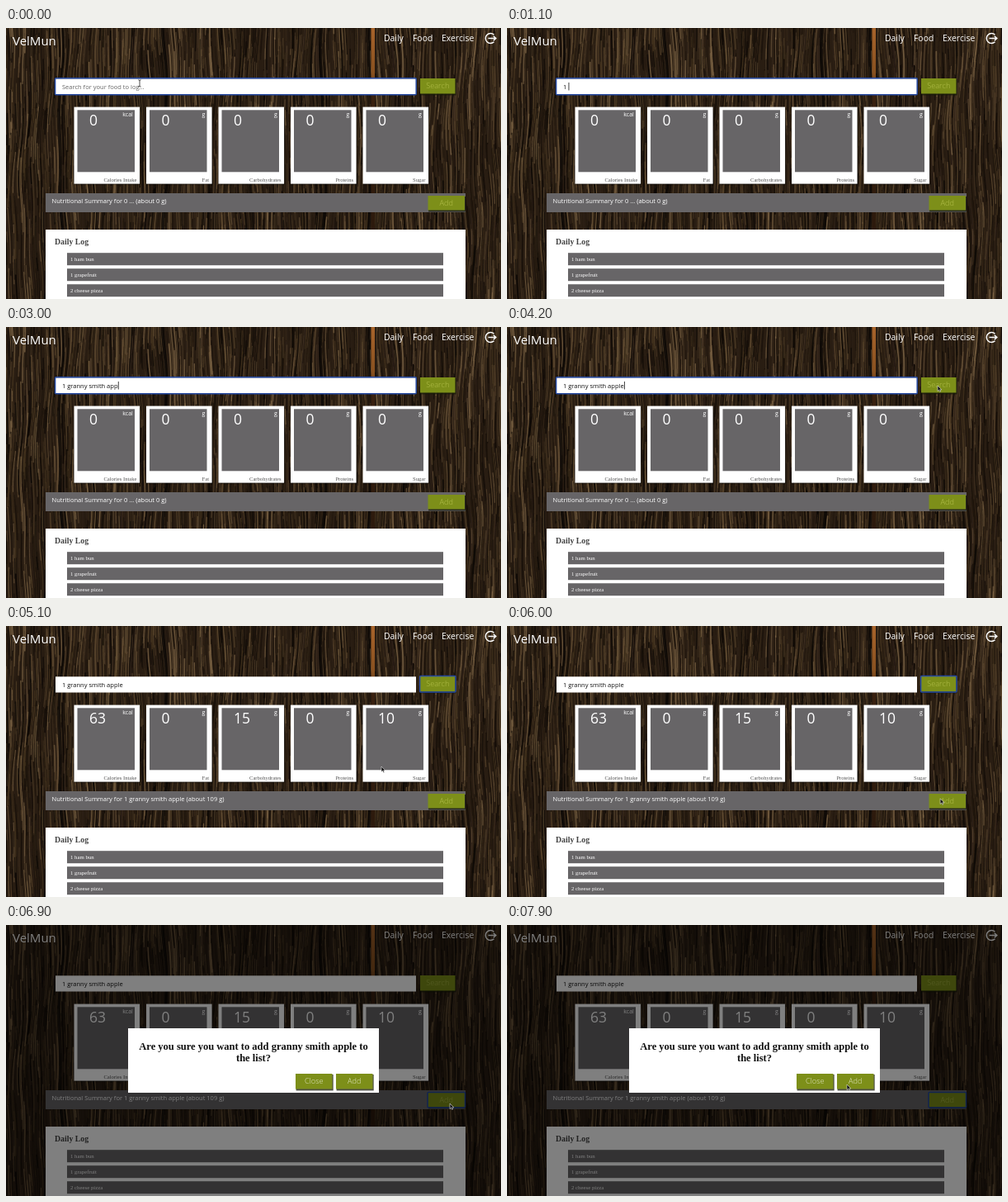
These frames come from a looping animation (600 by 328 pixels, 8000 ms). An HTML page with a canvas:

```html
<!DOCTYPE html>
<html lang="en">
<head>
<meta charset="utf-8">
<title>Food log</title>
<style>
  html, body { margin: 0; width: 100%; height: 100%; overflow: hidden; background: #21170e; }
  canvas, svg { position: absolute; left: 0; top: 0; width: 100vw; height: 100vh; display: block; }
  text { font-family: "Open Sans", "Noto Sans", sans-serif; white-space: pre; }
  .serif { font-family: "Liberation Serif", "Noto Serif", serif; }
  .thin { font-weight: 300; }
</style>
</head>
<body>
<canvas id="wood" width="600" height="328"></canvas>
<svg id="stage" viewBox="0 0 600 328" preserveAspectRatio="none"></svg>
<script>
const LOOP = 8000;
const QUERY = '1 granny smith apple';
const GREY = '#676567';
const GREEN = '#7d8f19';
const stage = document.getElementById('stage');

function add(tag, attrs, parent = stage) {
  const node = document.createElementNS('http://www.w3.org/2000/svg', tag);
  for (const key in attrs) node.setAttribute(key, attrs[key]);
  parent.appendChild(node);
  return node;
}
function box(x, y, w, h, fill, parent, extra = {}) {
  return add('rect', { x, y, width: w, height: h, fill, ...extra }, parent);
}
function label(content, x, y, size, fill, extra = {}, parent = stage) {
  const node = add('text', { x, y, 'font-size': size, fill, ...extra }, parent);
  node.textContent = content;
  return node;
}
function button(content, x, y, w, h, ink, parent = stage) {
  box(x + .6, y + 1, w + .6, h + .9, '#171a08', parent, { opacity: .75 });
  box(x, y, w, h, GREEN, parent);
  label(content, x + w / 2, y + h / 2 + 3.2, 9.2, ink, { 'text-anchor': 'middle', class: 'thin' }, parent);
}
function ring(x, y, w, h) {
  return box(x, y, w, h, 'none', stage, { stroke: '#2448a0', 'stroke-width': 1.5, rx: 1 });
}
function show(node, visible) {
  node.setAttribute('visibility', visible ? 'visible' : 'hidden');
}

function paintWood() {
  const g = document.getElementById('wood').getContext('2d');
  let seed = 4711;
  const rnd = () => (seed = (seed * 16807) % 2147483647) / 2147483647;
  const tones = ['#090604', '#120c07', '#1d140c', '#30231a', '#46351f', '#5f4a30', '#806747'];
  const bend = (x, y) => 2.2 * Math.sin(y / 47 + x / 38) + 1.2 * Math.sin(y / 19 + x / 11);
  g.fillStyle = '#291d12';
  g.fillRect(0, 0, 600, 328);
  g.lineCap = 'round';
  function grain(x, y, length, width, color, alpha) {
    g.globalAlpha = alpha;
    g.strokeStyle = color;
    g.lineWidth = width;
    g.beginPath();
    for (let d = 0; d <= length; d += 6) g.lineTo(x + bend(x, y + d), y + d);
    g.stroke();
  }
  for (let i = 0; i < 5200; i++) {
    const tone = tones[Math.floor(rnd() * tones.length)];
    grain(rnd() * 606 - 3, rnd() * 400 - 70, 12 + rnd() * 85, .4 + rnd() * 1.3, tone, .35 + rnd() * .5);
  }
  for (const x of [67, 193, 384, 441]) grain(x, -4, 340, 3.5, '#070403', .75);
  g.globalAlpha = 1;
  const seam = g.createLinearGradient(0, 0, 0, 328);
  seam.addColorStop(0, '#a8642b');
  seam.addColorStop(.17, '#87501f');
  seam.addColorStop(.24, '#3a2110');
  seam.addColorStop(1, '#25160b');
  g.fillStyle = seam;
  g.fillRect(442.5, 0, 4.5, 328);
}
paintWood();

// Header
label('VelMun', 8, 21, 15, '#fff');
label('Daily', 458, 16.3, 10.4, '#fff');
label('Food', 493, 16.3, 10.4, '#fff');
label('Exercise', 528, 16.3, 10.4, '#fff');
add('path', {
  d: 'M591.5 8.2A6 6 0 1 0 591.5 16.8M584.5 12.5H593.5M590.8 9.8L593.8 12.5L590.8 15.2',
  fill: 'none', stroke: '#fff', 'stroke-width': 1.5
});

// Search
box(60, 61.3, 437, 19.2, '#fff');
const inputRing = ring(59.6, 60.8, 437.6, 20);
const query = label('', 68, 73.7, 7.53, '#222');
const caret = box(0, 66, .8, 9.5, '#111');
button('Search', 502, 61, 42.5, 18.5, '#b4c04c');
const searchRing = ring(501.6, 60.6, 43.4, 19.4);

// Nutrient cards
const cards = [
  ['Calories Intake', 'kcal', 63], ['Fat', 'g', 0], ['Carbohydrates', 'g', 15],
  ['Proteins', 'g', 0], ['Sugar', 'g', 10]
].map(([name, unit, amount], i) => {
  const x = 82.5 + i * 87.5;
  box(x + .6, 96.4, 80, 93.2, '#000', stage, { opacity: .5 });
  box(x, 95.6, 79.6, 93, '#fff');
  box(x + 4, 99.3, 69.5, 75, GREY);
  label(unit, x + 71.3, 106.7, 7, '#fff', { 'text-anchor': 'end' });
  label(name, x + 76, 186.4, 6.6, '#555', { 'text-anchor': 'end', class: 'serif' });
  return { amount, node: label('0', x + 18.5, 118.4, 17.5, '#fff') };
});

// Summary
box(48, 200, 509, 23, GREY);
const summary = label('', 55.5, 212, 7.53, '#fff');
button('Add', 511.5, 203, 44.5, 17.5, '#b4c04c');
const addRing = ring(511, 202.5, 45.5, 18.6);

// Daily log
box(48, 244, 509, 84, '#fff');
label('Daily Log', 59, 262, 9.8, '#444', { class: 'serif', 'font-weight': 700 });
['1 ham bun', '1 grapefruit', '2 cheese pizza'].forEach((item, i) => {
  box(74, 272.2 + i * 19, 456, 15, GREY);
  label(item, 78, 282 + i * 19, 6.8, '#fff', { class: 'serif' });
});

// Confirmation dialog
const dialog = add('g', {});
box(0, 0, 600, 328, '#000', dialog, { opacity: .5 });
box(148, 125, 304, 78, '#fff', dialog);
['Are you sure you want to add granny smith apple to', 'the list?'].forEach((line, i) =>
  label(line, 300, 151 + i * 14.3, 12.5, '#111',
    { class: 'serif', 'font-weight': 700, 'text-anchor': 'middle' }, dialog));
button('Close', 351, 180, 44.5, 18.5, '#e4e8c4', dialog);
button('Add', 400, 180, 44.5, 18.5, '#e4e8c4', dialog);

// Pointers
const arrow = add('path', {
  d: 'M0 0V6.6L1.6 5.2L2.6 7.5L3.7 7L2.7 4.8H4.8Z', fill: '#111', stroke: '#fff', 'stroke-width': .5
});
const beam = add('path', {
  d: 'M-1.6 -4.2Q0 -4.2 0 -3.2V3.2Q0 4.2 -1.6 4.2M1.6 -4.2Q0 -4.2 0 -3.2M0 3.2Q0 4.2 1.6 4.2',
  fill: 'none', stroke: '#222', 'stroke-width': .8
});

const path = [
  [0, 162, 67], [3600, 162, 67], [4200, 522, 71], [4650, 522, 71],
  [5100, 455, 170], [5400, 455, 170], [6200, 538, 216], [7000, 538, 216], [7700, 412, 193], [LOOP, 412, 193]
];
function pointerAt(t) {
  const i = Math.max(1, path.findIndex(p => p[0] > t));
  const [t0, x0, y0] = path[i - 1], [t1, x1, y1] = path[i];
  const u = (t - t0) / (t1 - t0), k = u * u * (3 - 2 * u);
  return [x0 + (x1 - x0) * k, y0 + (y1 - y0) * k];
}

function render(t) {
  const typed = t < 1000 ? 0 : Math.min(QUERY.length, Math.floor(2 + Math.max(0, t - 1100) / 118));
  const searched = t >= 4300, found = t >= 4600, adding = t >= 6600;

  query.textContent = typed ? QUERY.slice(0, typed) : 'Search for your food to log...';
  query.setAttribute('fill', typed ? '#111' : '#666');
  const typing = typed > 0 && typed < QUERY.length;
  show(caret, typed > 0 && !searched && (typing || t % 1000 < 500));
  caret.setAttribute('x', 68.3 + query.getComputedTextLength());

  show(inputRing, !searched);
  show(searchRing, searched && !adding);
  show(addRing, adding);
  for (const { node, amount } of cards) node.textContent = found ? amount : 0;
  summary.textContent = 'Nutritional Summary for ' + (found ? QUERY + ' (about 109 g)' : '0 ... (about 0 g)');
  show(dialog, t >= 6850);

  const [x, y] = pointerAt(t);
  const overInput = x > 60 && x < 497 && y > 61 && y < 81;
  const awake = t < 1000 || t >= 3600;
  show(beam, awake && overInput);
  show(arrow, awake && !overInput);
  for (const node of [beam, arrow]) node.setAttribute('transform', `translate(${x} ${y})`);
}

const start = performance.now();
function tick() {
  render((performance.now() - start) % LOOP);
  requestAnimationFrame(tick);
}
tick();
</script>
</body>
</html>
```
